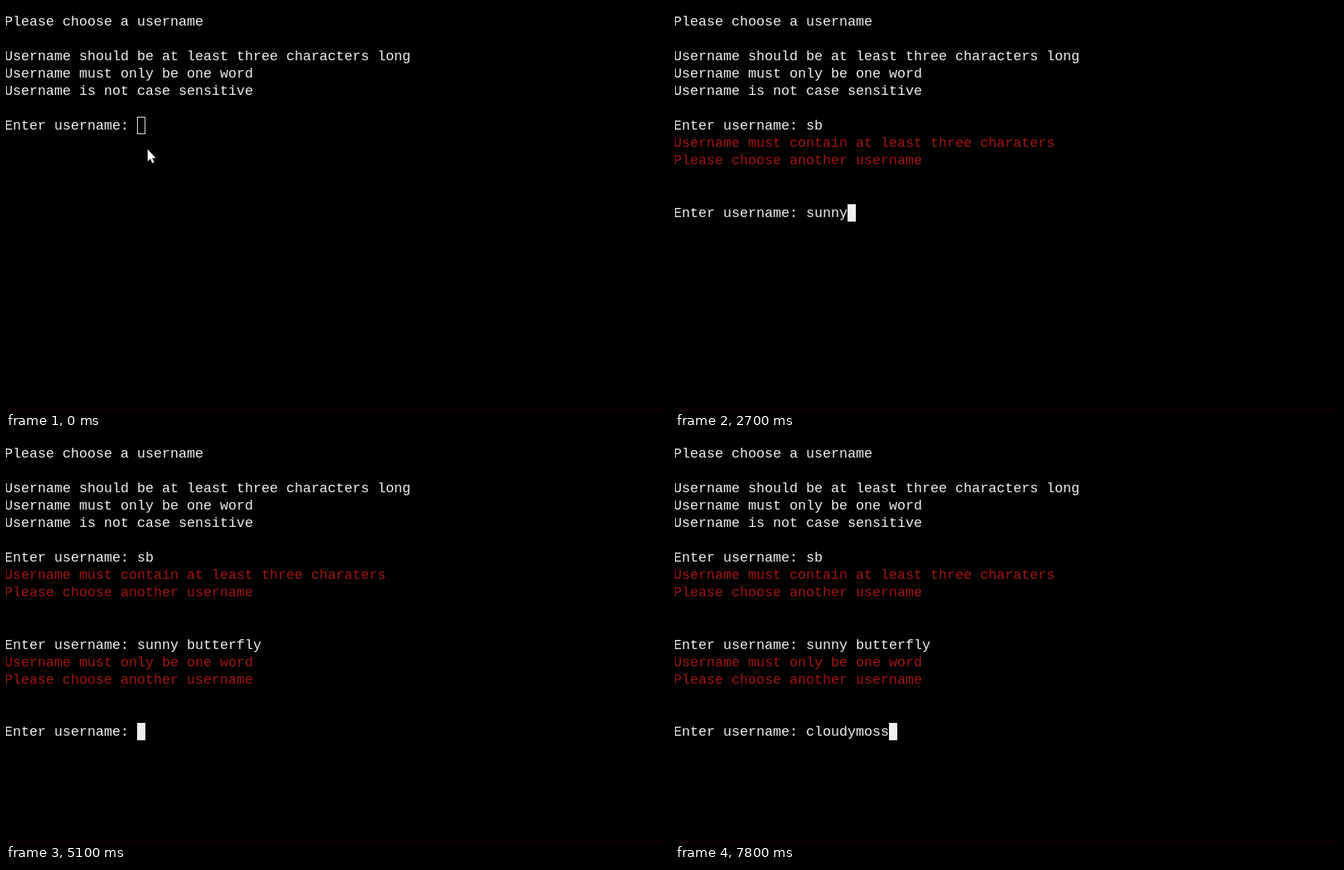
Recreate the animation shown at these times as an HTML page with a canvas. Size 880x536 px, loop 8 s.

```html
<!DOCTYPE html>
<html lang="en">
<head>
<meta charset="utf-8">
<title>Choose a username</title>
<style>
  html, body { margin: 0; width: 100%; height: 100%; overflow: hidden; background: #000; }
  canvas { display: block; }
</style>
</head>
<body>
<canvas id="screen" width="880" height="536"></canvas>
<script>
const ctx = document.getElementById('screen').getContext('2d', { alpha: false });
const LOOP = 8000, CELL_W = 11, CELL_H = 23.05, LEFT = -2, TOP = 9;
const WHITE = '#f0f0f0', RED = '#a31410';
const PROMPT = 'Enter username: ';

const INTRO = [
  'Please choose a username', '',
  'Username should be at least three characters long',
  'Username must only be one word',
  'Username is not case sensitive'
];

// Each attempt: prompt row, start time, typed name, key times, and the error shown after it.
const ATTEMPTS = [
  { row: 6, start: 0, name: 'sb', keys: [100, 100], end: 100,
    error: 'Username must contain at least three charaters' },
  { row: 11, start: 100, name: 'sunny butterfly', end: 5100,
    keys: [1900, 2200, 2300, 2500, 2700, 2800, 3000, 3100, 3500, 3800, 3900, 4100, 4300, 4500, 4600],
    error: 'Username must only be one word' },
  { row: 16, start: 5100, name: 'cloudymoss', end: LOOP,
    keys: [5900, 6100, 6400, 6500, 6600, 6800, 7000, 7400, 7600, 7800] }
];

const cellX = col => LEFT + col * CELL_W;
const cellY = row => Math.round(TOP + row * CELL_H);

function write(row, text, color = WHITE) {
  ctx.fillStyle = color;
  [...text].forEach((char, col) => ctx.fillText(char, cellX(col), cellY(row) + 17));
}

function drawCaret(row, col, focused) {
  const x = cellX(col), y = cellY(row);
  ctx.fillStyle = ctx.strokeStyle = WHITE;
  if (focused) ctx.fillRect(x, y, CELL_W, 23);
  else ctx.strokeRect(x + 0.5, y + 0.5, CELL_W - 1, 22);
}

function drawPointer(x, y) {
  ctx.fillStyle = '#fff';
  ctx.fill(new Path2D(`M${x} ${y}v16l3.5-3.2 2.6 5.7 2.6-1.2-2.6-5.5h4.6z`));
}

function draw(time) {
  ctx.fillStyle = '#000';
  ctx.fillRect(0, 0, 880, 536);
  ctx.fillStyle = '#0a0005';
  ctx.fillRect(0, 532, 880, 4);
  ctx.font = '18.33px "Liberation Mono", "Courier New", monospace';

  INTRO.forEach((line, row) => write(row, line));
  for (const { row, start, name, keys, end, error } of ATTEMPTS) {
    if (time < start) break;
    const typed = keys.filter(key => key <= time).length;
    write(row, PROMPT + name.slice(0, typed));
    if (time < end) {
      drawCaret(row, PROMPT.length + typed, start > 0);
    } else {
      write(row + 1, error, RED);
      write(row + 2, 'Please choose another username', RED);
    }
  }
  if (time < 100) drawPointer(188, 190);
}

const origin = performance.now();
function tick() {
  draw((performance.now() - origin) % LOOP);
  requestAnimationFrame(tick);
}
tick();
</script>
</body>
</html>
```
